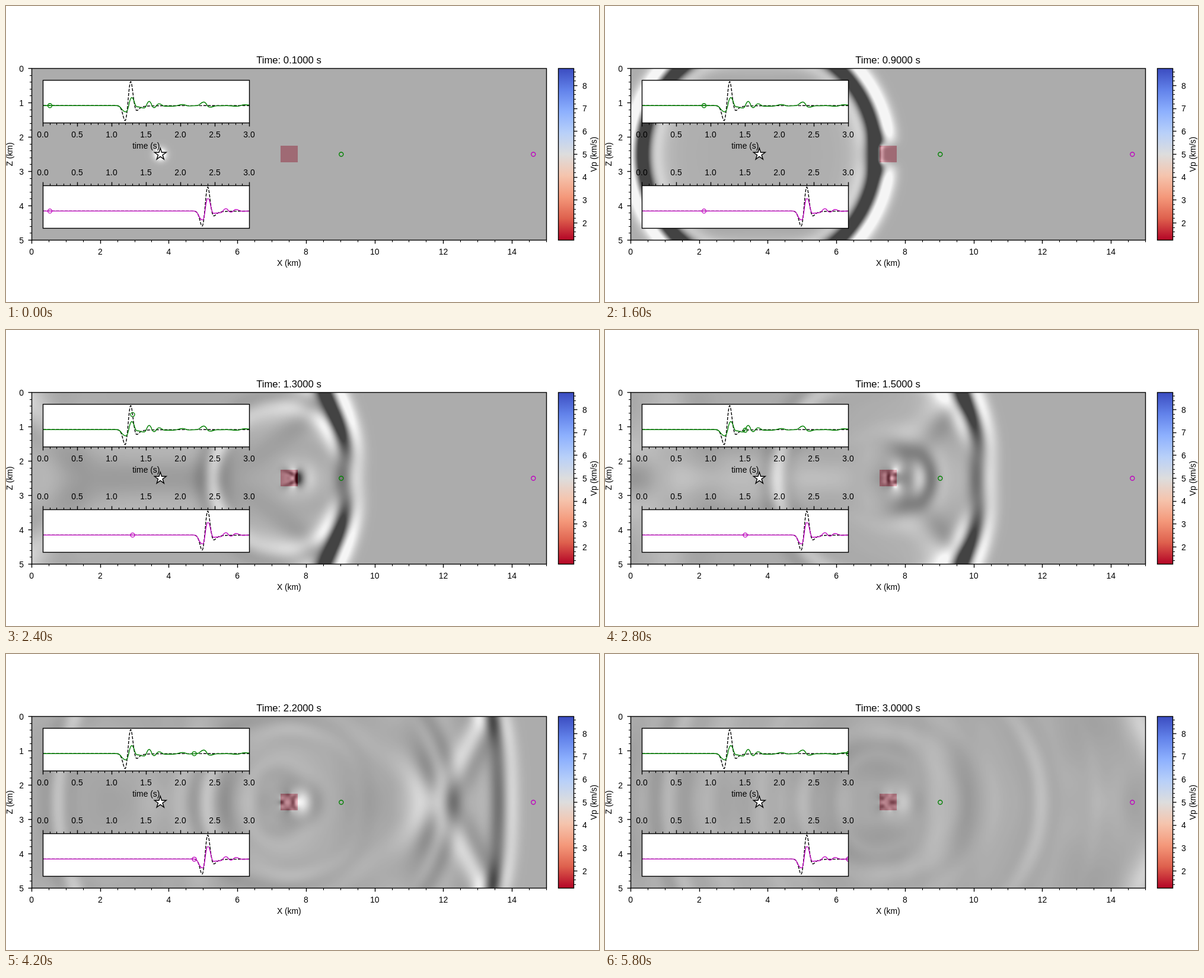
An HTML page with a canvas that plays this animation: 1000x500 px, repeating every 6000 ms.

```html
<!DOCTYPE html>
<html lang="en">
<head>
<meta charset="utf-8">
<title>Wave propagation past a slow block</title>
<style>
  html, body { margin: 0; width: 100%; height: 100%; overflow: hidden; background: #fff; }
  canvas { display: block; }
</style>
</head>
<body>
<canvas id="stage" width="1000" height="500"></canvas>
<script>
const ctx = document.getElementById('stage').getContext('2d');
const FRAME_MS = 200, FRAMES = 30;

// Physics in km and s
const SPEED = 5, BLOCK_SPEED = 1.25, PEAK_FREQ = 5, DELAY = 0.2;
const CELL = 0.025, DT = 0.0025, STEPS_PER_FRAME = 40;
const NX = 600, HALF_NZ = 100, PAD = 40;
const W = NX + 2 * PAD, H = HALF_NZ + PAD + 2;

function ricker(t) {
  const a = (Math.PI * PEAK_FREQ * (t - DELAY)) ** 2;
  return (1 - 2 * a) * Math.exp(-a);
}

// Exact response of a uniform 2D medium at a given distance
function directWave(distance, t) {
  const travel = distance / SPEED;
  if (t <= travel) return 0;
  const n = 240, step = Math.acosh(t / travel) / n;
  let sum = 0;
  for (let i = 0; i < n; i++) sum += ricker(t - travel * Math.cosh((i + 0.5) * step));
  return sum * step / (2 * Math.PI * SPEED ** 2);
}

// The field is symmetric about mid depth, so only the lower half is solved.
// Row 2 lies next to the symmetry line; rows 0 and 1 mirror rows 3 and 2.
let now = new Float32Array(W * H), before = new Float32Array(W * H), step = 0;
const stiffness = new Float32Array(W * H), damping = new Float32Array(W * H);
for (let row = 0; row < H; row++) {
  for (let col = 0; col < W; col++) {
    const i = col - PAD, j = row - 2;
    const inBlock = i >= 290 && i < 310 && j < 10;
    const depth = Math.max(0, -i, i - NX + 1, j - HALF_NZ + 1) / PAD;
    stiffness[row * W + col] = ((inBlock ? BLOCK_SPEED : SPEED) * DT / CELL) ** 2;
    damping[row * W + col] = Math.exp(-0.08 * depth * depth);
  }
}

function advance() {
  now.copyWithin(W, 2 * W, 3 * W);
  now.copyWithin(0, 3 * W, 4 * W);
  const u = now, p = before;
  for (let row = 2; row < H - 2; row++) {
    for (let k = row * W + 2, end = row * W + W - 2; k < end; k++) {
      const laplacian = (16 * (u[k - 1] + u[k + 1] + u[k - W] + u[k + W])
        - (u[k - 2] + u[k + 2] + u[k - 2 * W] + u[k + 2 * W]) - 60 * u[k]) / 12;
      const d = damping[k];
      p[k] = d * (2 * u[k] - d * p[k] + stiffness[k] * laplacian);
    }
  }
  const push = ricker(step * DT) * (DT / CELL) ** 2 / 4;
  p[2 * W + PAD + 149] += push;
  p[2 * W + PAD + 150] += push;
  [now, before] = [p, u];
  step++;
}

function sampleTrace(distance) {
  return Array.from({ length: 697 }, (_, i) => directWave(distance, i * 3 / 696));
}
const nearTrace = sampleTrace(5.27), farTrace = sampleTrace(10.87);
const clipLevel = 0.73 * Math.max(...nearTrace);

function fieldPicture() {
  const picture = document.createElement('canvas');
  picture.width = NX;
  picture.height = 2 * HALF_NZ;
  const pc = picture.getContext('2d'), image = pc.createImageData(NX, 2 * HALF_NZ);
  for (let y = 0, o = 0; y < 2 * HALF_NZ; y++) {
    const j = y < HALF_NZ ? HALF_NZ - 1 - y : y - HALF_NZ;
    for (let x = 0; x < NX; x++, o += 4) {
      const value = now[(j + 2) * W + PAD + x];
      image.data[o] = image.data[o + 1] = image.data[o + 2] = 150 * (1 - value / clipLevel);
      image.data[o + 3] = 255;
    }
  }
  pc.putImageData(image, 0, 0);
  return picture;
}

const pictures = [];
function pictureAt(frame) {
  while (pictures.length <= frame) {
    for (let i = 0; i < STEPS_PER_FRAME; i++) advance();
    pictures.push(fieldPicture());
  }
  return pictures[frame];
}

// Drawing helpers
const LINE = 1.39;
const snap = v => Math.round(v - 0.5) + 0.5;

function text(label, x, y, align = 'center', size = 13.89) {
  ctx.font = `${size}px "Liberation Sans", Arial, sans-serif`;
  ctx.textAlign = align;
  ctx.fillStyle = '#000';
  ctx.fillText(label, x, y);
}

function sideText(label, x, y) {
  ctx.save();
  ctx.translate(x, y);
  ctx.rotate(-Math.PI / 2);
  text(label, 0, 0);
  ctx.restore();
}

function box(x, y, w, h) {
  ctx.strokeStyle = '#000';
  ctx.lineWidth = LINE;
  ctx.strokeRect(x, y, w, h);
}

// Outward tick; (dx, dy) is the unit direction
function tick(x, y, dx, dy, major) {
  const length = major ? 6 : 3.5;
  ctx.strokeStyle = '#000';
  ctx.lineWidth = major ? LINE : 1.1;
  ctx.beginPath();
  ctx.moveTo(snap(x), snap(y));
  ctx.lineTo(snap(x) + dx * length, snap(y) + dy * length);
  ctx.stroke();
}

function ring(x, y, color) {
  ctx.strokeStyle = color;
  ctx.lineWidth = LINE;
  ctx.beginPath();
  ctx.arc(x, y, 3.5, 0, 7);
  ctx.stroke();
}

function star(x, y, radius) {
  ctx.beginPath();
  for (let i = 0; i < 10; i++) {
    const r = i % 2 ? radius * 0.382 : radius, a = i * Math.PI / 5;
    ctx.lineTo(x + r * Math.sin(a), y - r * Math.cos(a));
  }
  ctx.closePath();
  ctx.fillStyle = '#fff';
  ctx.fill();
  ctx.strokeStyle = '#000';
  ctx.lineWidth = LINE;
  ctx.stroke();
}

function drawField(frame) {
  ctx.drawImage(pictureAt(frame), 43, 105.5, 868.5, 290);
  ctx.fillStyle = 'rgba(221,221,221,.3)';
  ctx.beginPath();
  ctx.rect(43, 105.5, 868.5, 290);
  ctx.rect(463, 236, 29, 28);
  ctx.fill('evenodd');
  ctx.fillStyle = 'rgba(180,4,38,.3)';
  ctx.fillRect(463, 236, 29, 28);

  for (let k = 0; k <= 30; k++) {
    const x = 43.4 + k * 868 / 30, major = k % 4 === 0;
    tick(x, 395.5, 0, 1, major);
    if (major) text(k / 2, x - 0.4, 420);
  }
  for (let k = 0; k <= 25; k++) {
    const y = 105.5 + k * 290 / 25, major = k % 5 === 0;
    tick(43.5, y, -1, 0, major);
    if (major) text(k / 5, 30, y + 5, 'right');
  }
  box(43.5, 105.5, 868, 290);
  text('X (km)', 477.3, 439);
  sideText('Z (km)', 11, 250.5);
  text(`Time: ${((frame + 1) / 10).toFixed(4)} s`, 477, 97, 'center', 16.67);

  star(260.3, 250.5, 10.4);
  ring(565.3, 250.5, '#008000');
  ring(889.3, 250.5, '#bf00bf');
}

const COOLWARM = ['#3b4cc0', '#6282ea', '#8db0fe', '#b8d0f9', '#dddddd',
  '#f5c4ad', '#f4987a', '#de604d', '#b40426'];

function drawColorbar() {
  const gradient = ctx.createLinearGradient(0, 105.5, 0, 395.5);
  COOLWARM.forEach((color, i) => gradient.addColorStop(i / 8, color));
  ctx.fillStyle = gradient;
  ctx.fillRect(931.5, 105.5, 26, 290);
  for (let k = 7; k <= 43; k++) {
    const y = 395.5 - (k / 5 - 1.25) / 7.5 * 290, major = k % 5 === 0;
    tick(957.5, y, 1, 0, major);
    if (major) text(k / 5, 972, y + 5, 'left');
  }
  box(931.5, 105.5, 26, 290);
  sideText('Vp (km/s)', 995.5, 250.5);
}

// Turning points of the two recorded traces: x, height above the baseline
const insets = [
  { top: 125.5, base: 168.3, color: '#008000', trace: nearTrace, tickY: 197.5, side: 1, labelY: 222,
    turns: [[62, 0], [187, 0], [202.5, -10.5], [212, 13.5], [221, -2], [233, -4], [241.5, 7],
      [249.5, -3.5], [258, 3.2], [268, -1], [282, -1], [298, 1.8], [308, -0.6], [322, 0],
      [333.5, 6], [343.5, -2.6], [356, -0.3], [372, 0], [389, -1], [403, 1.5], [410, 1]] },
  { top: 303.5, base: 346.4, color: '#bf00bf', trace: farTrace, tickY: 303.5, side: -1, labelY: 286,
    turns: [[62, 0], [318, 0], [331.5, -15], [340.5, 21.3], [350, -3.8], [361, -3], [371, 4],
      [379, -2], [387.5, 2.6], [399, -0.3], [410, 0]] }
];

function drawInset({ top, base, color, trace, tickY, side, labelY, turns }, frame) {
  ctx.fillStyle = '#fff';
  ctx.fillRect(62.5, top, 348, 72);
  for (let k = 0; k <= 30; k++) {
    const x = 62.5 + k * 11.6, major = k % 5 === 0;
    tick(x, tickY, 0, side, major);
    if (major) text((k / 10).toFixed(1), x - 0.5, labelY);
  }

  ctx.save();
  ctx.beginPath();
  ctx.rect(62.5, top, 348, 72);
  ctx.clip();
  ctx.lineWidth = LINE;
  const scale = 40.5 / Math.max(...trace);

  ctx.strokeStyle = '#000';
  ctx.setLineDash([5.1, 2.2]);
  ctx.beginPath();
  trace.forEach((value, i) => ctx.lineTo(62.5 + i / 2, base - value * scale));
  ctx.stroke();
  ctx.setLineDash([]);

  ctx.strokeStyle = color;
  ctx.beginPath();
  ctx.moveTo(62, base);
  for (let i = 1; i < turns.length; i++) {
    const [x0, h0] = turns[i - 1], [x, h] = turns[i], mid = (x0 + x) / 2;
    ctx.bezierCurveTo(mid, base - h0, mid, base - h, x, base - h);
  }
  ctx.stroke();

  const sample = Math.round((frame + 1) * 23.2);
  ring(62.5 + sample / 2, base - trace[sample] * scale, color);
  ctx.restore();
  box(62.5, top, 348, 72);
}

let shown = -1;
function render() {
  const frame = Math.floor(performance.now() / FRAME_MS) % FRAMES;
  if (frame !== shown) {
    shown = frame;
    ctx.fillStyle = '#fff';
    ctx.fillRect(0, 0, 1000, 500);
    drawField(frame);
    drawColorbar();
    insets.forEach(inset => drawInset(inset, frame));
    text('time (s)', 236.3, 241);
  }
  requestAnimationFrame(render);
}
render();
</script>
</body>
</html>
```
